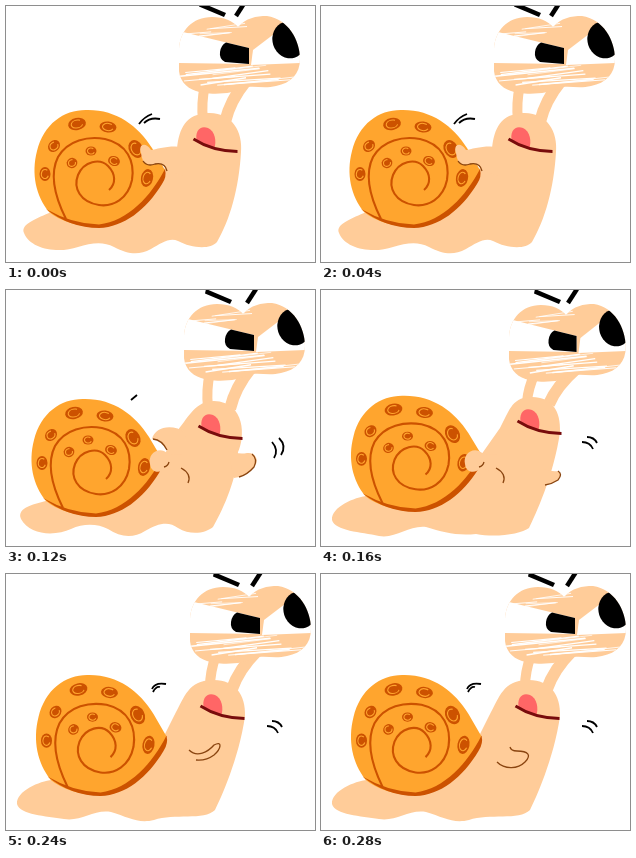
An HTML page with a canvas that plays this animation: 309 by 256 pixels, repeating every 0.32 s.

```html
<!DOCTYPE html>
<html lang="en">
<head>
<meta charset="utf-8">
<title>Snail</title>
<style>
html, body { margin: 0; width: 100%; height: 100%; overflow: hidden; background: #fff; }
canvas { display: block; width: 309px; height: 256px; }
</style>
</head>
<body>
<canvas id="stage" width="309" height="256"></canvas>
<script>
const ctx = document.getElementById('stage').getContext('2d');
const SKIN = '#ffcc99', SHELL = '#ffa52e', RUST = '#cc5200', LINE = '#8a4510';
const STEP = 40, STEPS = 8;

// Each pose is held for two steps; the arms change on every step.
const poses = [
  {
    body: 'M45 206C32 212 14 218 18 227C24 243 52 248 72 241C85 237 97 235 108 241C122 248 132 250 145 243C155 237 164 231 172 235C185 242 204 244 211 236C224 214 233 182 235 146C237 126 226 106 202 107C180 108 173 122 171 143L155 168Z',
    shell: [0, 0, 1], face: [0, 0], eyes: [0, 1, 1], brows: [194, -2, 239],
    marks: 'M133 118Q138 111 146 108M138 117Q144 111 154 113'
  },
  {
    body: 'M43 210C30 214 10 217 15 229C24 246 50 246 65 239C78 233 92 234 102 239C115 248 128 248 139 241C152 233 163 231 172 238C185 246 200 243 207 237C219 216 231 187 232 162C239 148 240 112 208 111C190 111 183 126 172 140L150 180Z',
    shell: [-3, 5, 1], face: [5, 3], eyes: [5, 4, 1], brows: [200, 1, 250],
    marks: 'M125 110L131 105M273 148Q281 156 275 165M266 152Q273 160 268 168'
  },
  {
    body: 'M46 206C34 207 10 217 11 230C14 241 40 242 58 246C75 249 88 235 105 237C122 242 135 246 155 244C175 248 200 244 208 238C214 226 233 185 239 142C240 120 230 106 209 107C190 108 188 122 179 138L160 165L152 185Z',
    shell: [1.5, 0, .985], face: [9, -2], eyes: [15, 5, .965], brows: [214, 1, 256],
    marks: 'M266 147Q273 147 276 153M261 152Q269 152 272 159'
  },
  {
    body: 'M46 206C34 207 10 217 11 230C14 241 40 242 58 245C75 248 88 235 105 238C122 243 132 250 148 246C168 239 198 247 209 236C214 226 233 185 239 142C240 120 228 105 206 106C182 107 179 122 168 142L155 168Z',
    shell: [1.5, 0, 1.025], face: [7, -1], eyes: [11, 3, 1], brows: [208, 0, 255],
    marks: 'M146 115Q149 108 160 110M147 118Q150 112 154 113M266 147Q273 147 276 153M261 152Q269 152 272 159'
  }
];

const highArm = {
  skin: 'M177 141C163 139 151 143 145 144C139 135 132 139 135 147C136 153 137 158 145 159Q158 155 161 165L177 170Z',
  line: 'M137 155Q141 161 149 158Q159 156 161 165'
};
const reach = {
  skin: 'M222 160Q232 165 241 163C250 162 253 170 249 176Q242 186 228 188Z',
  line: 'M246 164Q252 169 248 177Q241 185 233 187'
};
const lowHand = {
  skin: 'M178 164Q164 166 158 161C149 158 142 166 144 174C145 183 154 184 160 178L178 184Z',
  line: 'M158 177Q162 176 163 172M175 178Q186 184 182 193'
};
const arms = [
  [highArm],
  [highArm],
  [{
    skin: 'M178 143C160 135 153 141 145 144C136 139 135 148 138 152Q144 156 154 154Q161 159 163 172L178 176Z',
    line: 'M138 151Q142 156 151 153Q163 156 163 170'
  }, reach],
  [{ skin: 'M180 143C166 133 149 137 146 149Q158 150 163 166L178 168Z', line: 'M147 149Q156 150 161 160' }, lowHand, reach],
  [lowHand, {
    skin: 'M222 179Q231 182 237 181Q242 184 237 190Q231 194 222 195Z',
    line: 'M237 181Q242 184 237 190Q231 194 224 195'
  }],
  [{ line: 'M191 163C202 167 204 157 213 157C225 158 220 173 209 180Q202 184 195 183' }],
  [{ line: 'M183 176C191 184 202 178 208 171C217 166 215 175 208 181Q200 187 190 186' }],
  [{ line: 'M176 188C184 196 197 195 204 188C211 181 207 177 196 177Q190 177 189 173' }]
];

// x, y, radius x, radius y, tilt
const spots = [
  [71, 118, 9, 6, -.2], [102, 121, 8.5, 5.5, .1], [130, 143, 7, 9.5, -.5],
  [48, 140, 6.5, 5.5, -.8], [39, 168, 5.5, 7, 0], [85, 145, 5.5, 4.5, 0],
  [66, 157, 5.5, 5, -.6], [108, 155, 6, 5, .3], [141, 172, 6, 9, .2]
];

function fill(path, color) {
  ctx.fillStyle = color;
  ctx.fill(new Path2D(path));
}

function stroke(path, color, width) {
  ctx.strokeStyle = color;
  ctx.lineWidth = width;
  ctx.stroke(new Path2D(path));
}

function oval(x, y, rx, ry, tilt, color) {
  ctx.beginPath();
  ctx.ellipse(x, y, rx, ry, tilt, 0, 7);
  ctx.fillStyle = color;
  ctx.fill();
}

function group(draw) {
  ctx.save();
  draw();
  ctx.restore();
}

function seeded(seed) {
  return () => (seed = seed * 16807 % 2147483647) / 2147483647;
}

function drawShell([dx, dy, scaleY]) {
  ctx.translate(dx, dy + 221 * (1 - scaleY));
  ctx.scale(1, scaleY);
  fill('M43 206C30 190 25 168 31 145C38 117 59 103 82 104C111 104 132 120 146 142L159 164C151 192 124 219 93 221C73 221 54 215 43 206Z', SHELL);
  fill('M40 203Q66 218 93 218.5C122 215 145 190 159 163Q161 171 156 178C140 204 118 221 93 222Q64 222 40 203Z', RUST);
  stroke('M60 213C50 193 43 169 52 151C62 134 82 130 99 133C121 138 129 155 126 174C122 193 107 201 93 199C74 196 67 182 72 169C78 155 94 152 102 160C110 168 110 178 103 184', RUST, 2.1);
  for (const [x, y, rx, ry, tilt] of spots) {
    oval(x, y, rx, ry, tilt, RUST);
    ctx.strokeStyle = SHELL;
    ctx.lineWidth = 1.1;
    ctx.beginPath();
    ctx.ellipse(x, y, rx * .65, ry * .65, tilt, .4, 5.4);
    ctx.stroke();
  }
}

function drawStalks([fx, fy], [ex, ey]) {
  const stalk = (x0, y0, mx, my, x1, y1) =>
    `M${x0 + fx} ${y0 + fy}Q${mx + (fx + ex) / 2} ${my + (fy + ey) / 2} ${x1 + ex} ${y1 + ey}`;
  stroke(stalk(197, 114, 195, 97, 199, 78), SKIN, 10);
  stroke(stalk(219, 116, 224, 94, 240, 74), SKIN, 12);
}

function drawFace([dx, dy]) {
  ctx.translate(dx, dy);
  fill('M191 136C188 124 195 119 202 122C209 125 211 136 208 143Q199 141 191 136Z', '#ff6666');
  stroke('M187.5 133Q206 145 231.5 145.5', '#780c0c', 2.8);
}

function drawEyes([dx, dy, scaleX]) {
  ctx.translate(dx + 173 * (1 - scaleX), dy);
  ctx.scale(scaleX, 1);
  const outline = 'M173 42C174 24 186 10 206 10C218 10 227 14 232 20C240 11 250 9 261 9C282 12 294 33 294 52C294 67 285 76 270 79C258 82 246 78 238 81C226 88 200 88 190 84C180 81 172 72 173 60Z';
  fill(outline, SKIN);
  ctx.clip(new Path2D(outline));

  const random = seeded(41);
  for (let i = 0; i < 13; i++) {
    const x = 174 + random() * 45, y = 63 + random() * 16;
    stroke(`M${x} ${y}L${x + 45 + random() * 35} ${y - 4 - random() * 5}`, '#fff', .5 + random());
  }
  for (let i = 0; i < 6; i++) {
    const x = 178 + random() * 28, y = 20 + random() * 12;
    stroke(`M${x} ${y}l${25 + random() * 18} ${-1 - random() * 5}`, '#fff', .5 + random() * .7);
  }

  fill('M165 22L181 26L214 34L243 41V57L165 56Z', '#fff');
  fill('M245 58L247 43L268 27L295 25V56Z', '#fff');
  fill('M214 45Q215 38 220 35.5L243 41V57L219 55Q213 52 214 45Z', '#000');
  oval(283, 33, 16.5, 18.5, -.3, '#000');
}

function drawBrows([x, y, rightX]) {
  fill(`M${x} ${y - 2}L${x + 26} ${y + 9}L${x + 24} ${y + 13}L${x - 1} ${y + 2.5}Z`, '#000');
  stroke(`M${rightX} ${y - 2}L${rightX - 9} ${y + 12}`, '#000', 4.5);
}

function draw(step) {
  const pose = poses[step >> 1];
  ctx.fillStyle = '#fff';
  ctx.fillRect(0, 0, 309, 256);
  stroke(pose.marks, '#000', 1.8);
  drawStalks(pose.face, pose.eyes);
  fill(pose.body, SKIN);
  group(() => drawShell(pose.shell));
  for (const { skin, line } of arms[step]) {
    if (skin) fill(skin, SKIN);
    stroke(line, LINE, 1.3);
  }
  group(() => drawFace(pose.face));
  group(() => drawEyes(pose.eyes));
  drawBrows(pose.brows);
}

function tick() {
  draw(Math.floor(performance.now() / STEP) % STEPS);
  requestAnimationFrame(tick);
}
tick();
</script>
</body>
</html>
```
